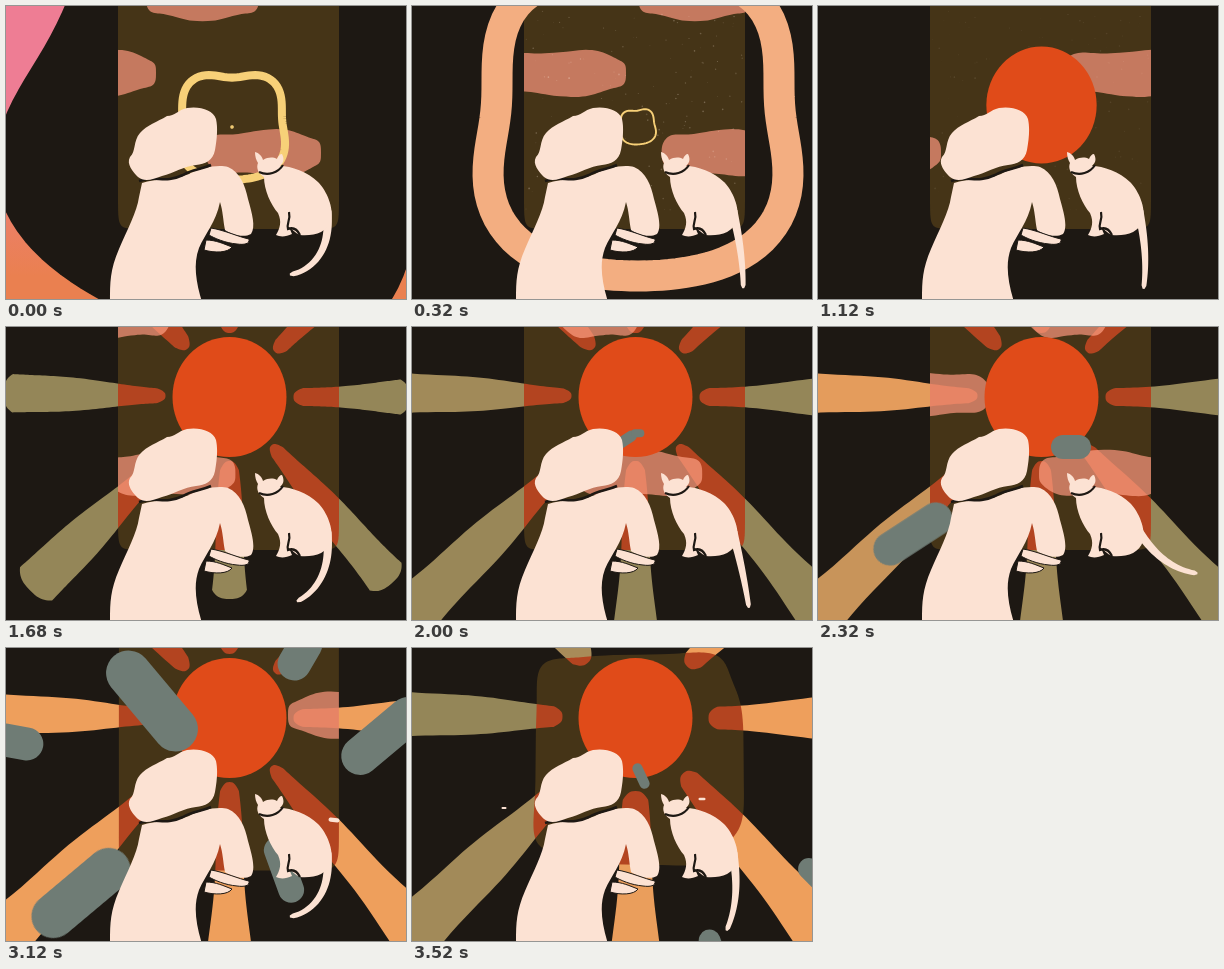
Animation of 400x293 px, one loop 3.6 s. Source, as an HTML page:

```html
<!DOCTYPE html>
<html lang="en">
<head>
<meta charset="utf-8">
<title>Window, sun and cat</title>
<style>
html,body{margin:0;width:100%;height:100%;overflow:hidden;background:#1d1813}
svg{display:block;width:100vw;height:100vh}
#clouds{mix-blend-mode:screen}
</style>
</head>
<body>
<svg viewBox="0 0 400 293" preserveAspectRatio="none">
  <defs>
    <clipPath id="pane"><path id="paneShape"/></clipPath>
    <linearGradient id="glow" gradientUnits="userSpaceOnUse" x1="0" y1="90" x2="0" y2="270">
      <stop offset="0" stop-color="#ee7d94"/><stop offset="1" stop-color="#ea8050"/>
    </linearGradient>
  </defs>
  <rect width="400" height="293" fill="#1d1813"/>
  <g id="rays"></g>
  <g clip-path="url(#pane)">
    <rect width="400" height="293" fill="#453417"/>
    <g id="specks" fill="#e9d9c8"></g>
    <g id="innerRays" fill="#b34420"></g>
    <g id="clouds" fill="#b0574f"></g>
    <ellipse id="sun" cx="223.5" fill="#e04b19"/>
  </g>
  <g id="rings" fill="none"></g>
  <g id="drops"></g>
  <g fill="#fce2d3">
    <path d="M136 177C150 172 166 175 183 168C194 162 212 158 222 161C234 166 239 179 242 193C246 207 250 221 245 228C238 232 226 229 219 224C217 214 217 205 214 196C210 216 199 228 193 242C187 258 190 276 196 296H104C104 276 104 264 113 243C121 224 131 206 133 191Z"/>
    <g stroke="#1d1813">
      <path d="M205 222C218 224 233 231 243 233C244 238 238 239 231 238C219 237 208 232 203 229Z"/>
      <path d="M200 234C210 234 218 238 226 241C222 247 208 247 198 244Z"/>
      <path d="M133 175C151 169 158 178 177 169C187 163 194 164 205 159" fill="none" stroke-width="2.5"/>
    </g>
    <path d="M181 102C194 100 207 104 210 113C212 122 211 133 209 144C207 155 199 158 190 159C178 160 168 167 156 170C146 174 138 176 132 171C127 166 120 158 124 151C130 146 127 135 134 127C141 119 151 116 161 110C169 110 172 104 181 102Z"/>
    <path id="tail"/>
    <path d="M249 146C253 147 256 150 257 154C262 151 267 151 271 153C272 150 274 148 276 148C279 154 277 157 274 160C285 160 302 166 312 176C321 185 328 202 325 214C321 227 308 230 294 229C289 227 286 223 283 221L286 228C280 231 274 231 270 229C274 222 276 216 272 207C265 199 258 184 258 171C252 167 250 162 252 157C250 154 249 150 249 146Z"/>
    <path d="M253 166C262 170 272 167 277 159M283 206C285 214 280 218 282 223C287 221 291 223 294 229" fill="none" stroke="#1d1813" stroke-width="2.2"/>
  </g>
</svg>
<script>
const LOOP = 3600, STEP = 80, SUN = [223.5, 70];
const { sin, cos, abs, sign, min, max, PI } = Math;
const $ = id => document.getElementById(id);
const set = (el, attrs) => { for (const k in attrs) el.setAttribute(k, attrs[k]); };
const add = (parent, tag, attrs = {}) => {
  const el = document.createElementNS('http://www.w3.org/2000/svg', tag);
  set(el, attrs);
  return $(parent).appendChild(el);
};
const show = (el, on) => set(el, { visibility: on ? 'visible' : 'hidden' });
const clamp = (v, a = 0, b = 1) => max(a, min(b, v));
const span = (t, a, b) => clamp((t - a) / (b - a));
const lerp = (a, b, p) => a + (b - a) * p;
const ease = p => p * p * (3 - 2 * p);
const mix = (a, b, p) => `rgb(${a.map((v, i) => Math.round(lerp(v, b[i], p)))})`;
const poly = pts => 'M' + pts.join('L') + 'Z';
// closed outline from a function of the angle
const outline = (fn, n = 120) => poly(Array.from({ length: n }, (_, i) => fn(i / n * 2 * PI)));
const bulge = (v, power) => sign(v) * abs(v) ** power;

// the pane starts as a tall rounded box and ends as a wobbly blob
function drawPane(t) {
  const p = ease(span(t, 3040, 3520));
  const cx = lerp(222.5, 225, p), cy = lerp(82, 110, p), w = lerp(110.5, 104, p), h = lerp(141, 105, p);
  const power = lerp(.08, .4, p);
  set($('paneShape'), { d: outline(a => {
    const wave = 1 + .03 * p * sin(5 * a + 1);
    return [cx + w * wave * bulge(cos(a), power), cy + h * wave * bulge(sin(a), power)];
  }, 240) });
}

// dust on the glass
let seed = 7;
const rand = () => (seed = seed * 16807 % 2147483647) / 2147483647;
for (let i = 0; i < 160; i++)
  add('specks', 'circle', { cx: 114 + rand() * 217, cy: 5 + rand() * 215, r: .3 + rand() * .6, opacity: .35 + rand() * .5 });

// clouds: time, left edge at that time, centre height, width, speed
const clouds = [
  [0, 140, -9, 113, .27], [0, 18, 67, 132, .2], [0, 200, 147, 115, .155],
  [1120, -7, 147, 130, .19], [1680, 85, -12, 80, .195], [2320, 42, 67, 130, .3]
].map(([at, left, y, w, speed], i) => ({
  at, left, y, speed,
  el: add('clouds', 'path', { d: outline(a => [
    w / 2 * (1 + bulge(cos(a), .8)),
    22 * bulge(sin(a), .6) * (1 + .1 * sin(5 * a + i))
  ]) })
}));

function drawClouds(t) {
  for (const c of clouds) {
    const x = c.left + (t - c.at) * c.speed;
    show(c.el, x < 340);
    set(c.el, { transform: `translate(${x},${c.y})` });
  }
}

// rays
const olive = [148, 134, 88], orange = [238, 159, 92];
const rays = [0, 49, 90, 136, 181, -131, -90, -45].map((angle, i) => ({
  angle, i, side: cos(angle * PI / 180), slant: abs(sin(angle * PI / 90)),
  outer: add('rays', 'path'), inner: add('innerRays', 'path')
}));

function rayPath(start, reach, half, phase) {
  const len = reach - start;
  return outline(a => {
    const x = start + len / 2 * (1 - bulge(cos(a), .9));
    const wide = half + (x - start) * .08 + 1.3 * sin(x / 24 + phase);
    const tip = clamp((x - start) / 9) * clamp((reach - x) / 9);
    return [x, sign(sin(a)) * wide * tip ** .35];
  }, 160);
}

function drawRays(t) {
  const late = span(t, 3160, 3520), start = lerp(64, 73, late), half = lerp(8, 11, late);
  for (const r of rays) {
    const grown = span(t, 1280, 1680);
    const reach = 64 + (t - 1280) * .39 + grown * (60 * r.slant - 18 - 22 * r.side);
    const on = reach > start + 10;
    const delay = 350 * (1 + r.side);
    const warm = span(t - delay, 1700, 2350) ** 2.5 - ease(span(t - delay, 3120, 3520));
    for (const el of [r.outer, r.inner]) {
      show(el, on);
      if (on) set(el, {
        d: rayPath(start, min(reach, 470), half, r.i * 1.9),
        transform: `translate(${SUN}) rotate(${r.angle})`
      });
    }
    set(r.outer, { fill: mix(olive, orange, warm) });
  }
}

// rings leave the middle of the window at even intervals and speed up
const yellow = [247, 208, 120], pink = [238, 130, 140];
const rings = [0, 530, 1060].map((age, i) => ({ age, turn: [.1, 0, -.38][i], el: add('rings', 'path') }));

function drawRings(t) {
  for (const { age, turn, el } of rings) {
    const r = max(1, 84 * ((t + age) / 640) ** 2.2);
    show(el, r < 400 && t < 1120);
    set(el, {
      d: outline(a => {
        const b = a + turn, d = r * (1 - .08 * cos(4 * b) + .03 * sin(5 * b));
        return [226 + d * cos(a), 121 + d * sin(a)];
      }),
      'stroke-width': max(1.5, 14 * (r / 85) ** 1.3),
      stroke: r > 220 ? 'url(#glow)' : mix(yellow, pink, span(r, 100, 230))
    });
  }
}

// drops flying out of the sun: time, centre at that time, length, angle
const FLIGHT = 480, FROM = [223, 105];
const drops = [
  [2320, 95, 207, 88, -33], [2320, 253, 120, 40, 0],
  [3120, 146, 53, 118, 50], [3120, 75, 245, 116, -40], [3120, 10, 94, 55, 10],
  [3120, 378, 88, 100, -40], [3120, 294, 6, 56, -60], [3120, 278, 222, 68, 70], [3120, 328, 172, 11, 5],
  [3520, 229, 128, 27, 65], [3520, 402, 226, 36, 45], [3520, 300, 299, 36, 70],
  [3520, 92, 160, 5, 0], [3520, 290, 151, 7, 0]
].map(([at, x, y, len, angle]) => ({
  at, x, y, len, angle,
  el: add('drops', 'rect', { fill: len < 15 ? '#fce2d3' : '#6f7c75' })
}));

function drawDrops(t) {
  for (const { at, x, y, len, angle, el } of drops) {
    const p = max(0, 1 + (t - at) / FLIGHT), go = p ** 2.2;
    const w = len * min(p, 1.2), h = w * (len > 30 && len < 60 ? .6 : .38);
    show(el, p > .3);
    set(el, {
      x: -w / 2, y: -h / 2, width: w, height: h, rx: h / 2,
      transform: `translate(${lerp(FROM[0], x, go)},${lerp(FROM[1], y, go)}) rotate(${angle})`
    });
  }
}

// tail: 0 is curled under, 1 is stretched out
const swing = [[0, 0], [640, 1], [1120, .45], [1680, .1], [2320, 1], [3120, 0], [3520, .35], [3600, 0]];
function swingAt(t) {
  const i = swing.findIndex(k => k[0] > t), [a, from] = swing[i - 1], [b, to] = swing[i];
  return lerp(from, to, ease(span(t, a, b)));
}

function drawTail(t) {
  const s = swingAt(t), steps = 24, step = lerp(82, 74, s) / steps;
  const left = [], right = [];
  let x = 321, y = 205;
  for (let i = 0; i <= steps; i++) {
    const u = i / steps, a = lerp(lerp(85, 55, s * s), lerp(175, 5, s), u ** 1.4) * PI / 180;
    const half = lerp(4.5, 2.3, u) * (i === steps ? .4 : 1);
    left.push([x - half * sin(a), y + half * cos(a)]);
    right.unshift([x + half * sin(a), y - half * cos(a)]);
    x += step * cos(a);
    y += step * sin(a);
  }
  set($('tail'), { d: poly([...left, ...right]) });
}

function drawSun(t) {
  const rise = span(t, 640, 1400);
  show($('sun'), t > 640);
  set($('sun'), { cy: SUN[1] + 214 * (1 - rise) ** 2, rx: lerp(52, 57, rise), ry: lerp(56, 60, rise) });
}

function draw(t) {
  for (const part of [drawPane, drawClouds, drawRays, drawRings, drawDrops, drawTail, drawSun]) part(t);
  set($('specks'), { opacity: max(0, 1 - abs(t - 640) / 560) });
}

const begin = performance.now();
function tick() {
  const t = (performance.now() - begin) % LOOP;
  draw(Math.floor(t / STEP) * STEP);
  requestAnimationFrame(tick);
}
tick();
</script>
</body>
</html>
```
